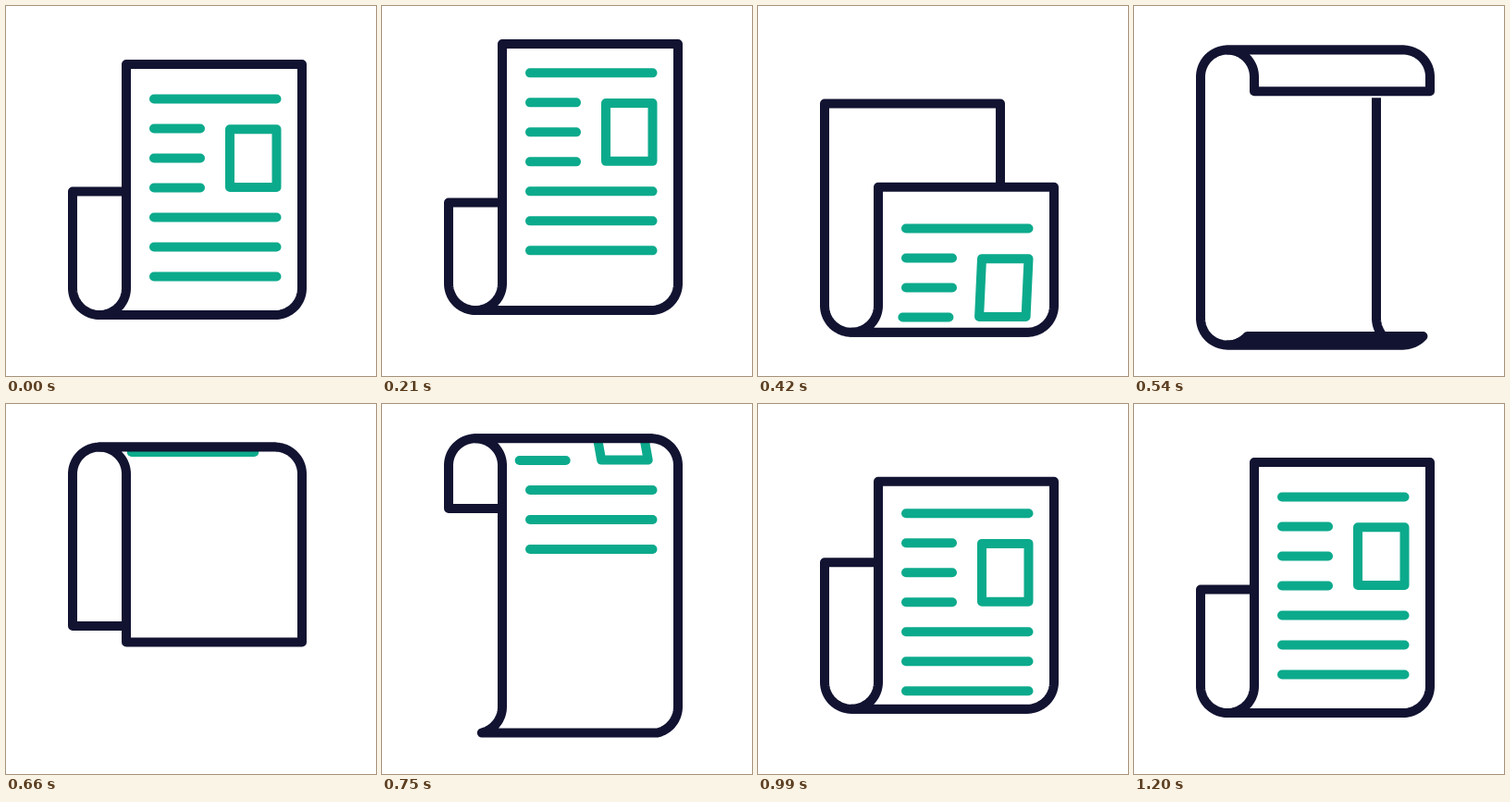
Animation of 400x400 px, one loop 2.23 s. Source, as an HTML page with a canvas:

```html
<!DOCTYPE html>
<html lang="en">
<head>
<meta charset="utf-8">
<title>Rolling newspaper</title>
<style>
  html, body { margin: 0; width: 100%; height: 100%; overflow: hidden; background: #fff; }
  canvas { display: block; width: 400px; height: 400px; }
</style>
</head>
<body>
<canvas id="stage"></canvas>
<script>
const LOOP = 2230, MOVE = 1200, STEP = 30;
const INK = '#121331', GREEN = '#0caa8c';

// The sheet runs around a stadium-shaped belt: down the front, up the back.
const R = 29, CX = 101, WIDTH = 190, SIDE = 261;
const TURN = Math.PI * R, BELT = 2 * (SIDE + TURN), SHEET = 437.5;
const FRONT = [-TURN / 2, SIDE + TURN / 2];
const BACK = [FRONT[1], FRONT[1] + BELT / 2];

// [time, value] keys, eased in and out between neighbours
const TAIL = [[0, 19], [206, 2], [1009, 749.5], [MOVE, 19 + BELT]];
const TEXT = [[0, 56.5], [186, 31.5], [1015, 784.7], [MOVE, 56.5 + BELT]];
const FLOOR = [[0, 334], [206, 329], [575, 367.5], [605, 367.5], [1008, 329.5], [MOVE, 334]];

const canvas = document.getElementById('stage');
const ctx = canvas.getContext('2d');
const dpr = window.devicePixelRatio || 1;
canvas.width = canvas.height = 400 * dpr;

function ease(keys, t) {
  for (let i = 1; i < keys.length; i++) {
    const [t0, a] = keys[i - 1], [t1, b] = keys[i];
    if (t <= t1) {
      const x = (t - t0) / (t1 - t0);
      return a + (b - a) * x * x * (3 - 2 * x);
    }
  }
  return keys[keys.length - 1][1];
}

// Point on the left edge of the belt at distance s
function beltPoint(s, top) {
  const arc = (angle, cy) => [CX + R * Math.cos(angle), cy + R * Math.sin(angle)];
  if (s < 0) return arc(s / R, top);
  if (s < SIDE) return [CX + R, top + s];
  s -= SIDE;
  if (s < TURN) return arc(s / R, top + SIDE);
  s -= TURN;
  if (s < SIDE) return [CX - R, top + SIDE - s];
  return arc(Math.PI + (s - SIDE) / R, top);
}

function outline(from, to, top) {
  const left = [], n = Math.max(2, Math.ceil((to - from) / 2));
  for (let i = 0; i <= n; i++) left.push(beltPoint(from + (to - from) * i / n, top));
  const right = left.map(([x, y]) => [x + WIDTH, y]).reverse();
  return polygon(left.concat(right));
}

function polygon(points) {
  const path = new Path2D();
  points.forEach(([x, y]) => path.lineTo(x, y));
  path.closePath();
  return path;
}

// Sideways drift of the print as it nears a roll
function drift(y, top, reach, slope) {
  const above = y - (top - R), below = top + SIDE + R - y;
  const up = Math.max(0, reach - above) * slope;
  const down = Math.max(0, 19 - below) * 1.35;
  return -Math.min(40, up + down);
}

function drawText(y0, top) {
  ctx.strokeStyle = GREEN;
  for (let i = 0; i < 7; i++) {
    const y = y0 + 32 * i, dx = drift(y, top, 40, 0.7);
    const end = i > 0 && i < 4 ? 210 : 292.5;
    ctx.beginPath();
    ctx.moveTo(160 + dx, y);
    ctx.lineTo(end + dx, y);
    ctx.stroke();
  }
  const corner = (x, y) => [x + drift(y, top, 50, 0.18), y];
  const a = y0 + 32.7, b = y0 + 95.5;
  ctx.stroke(polygon([corner(242, a), corner(292.5, a), corner(292.5, b), corner(242, b)]));
}

function drawPiece(range, tail, top, print) {
  const from = Math.max(range[0], tail), to = Math.min(range[1], tail + SHEET);
  if (from >= to) return;
  const path = outline(from, to, top);
  ctx.fillStyle = '#fff';
  if (print !== undefined) {
    // Small gap below the front flap
    if (to > 0 && to < SIDE) ctx.fill(outline(from, to + 7, top));
    ctx.fill(path);
    ctx.save();
    ctx.clip(path);
    drawText(print, top);
    ctx.restore();
  } else {
    ctx.fill(path);
  }
  ctx.strokeStyle = INK;
  ctx.stroke(path);
}

function draw(t) {
  const tail = ease(TAIL, t), text = ease(TEXT, t);
  const top = ease(FLOOR, t) - R - SIDE;
  ctx.setTransform(dpr, 0, 0, dpr, 0, 0);
  ctx.fillStyle = '#fff';
  ctx.fillRect(0, 0, 400, 400);
  ctx.lineWidth = 10;
  ctx.lineCap = ctx.lineJoin = 'round';
  const laps = [0, BELT];
  laps.forEach(lap => drawPiece(BACK, tail - lap, top));
  laps.forEach(lap => drawPiece(FRONT, tail - lap, top, top + text - lap));
}

const start = performance.now();
function tick() {
  const t = Math.min((performance.now() - start) % LOOP, MOVE);
  draw(Math.floor(t / STEP) * STEP);
  requestAnimationFrame(tick);
}
tick();
</script>
</body>
</html>
```
